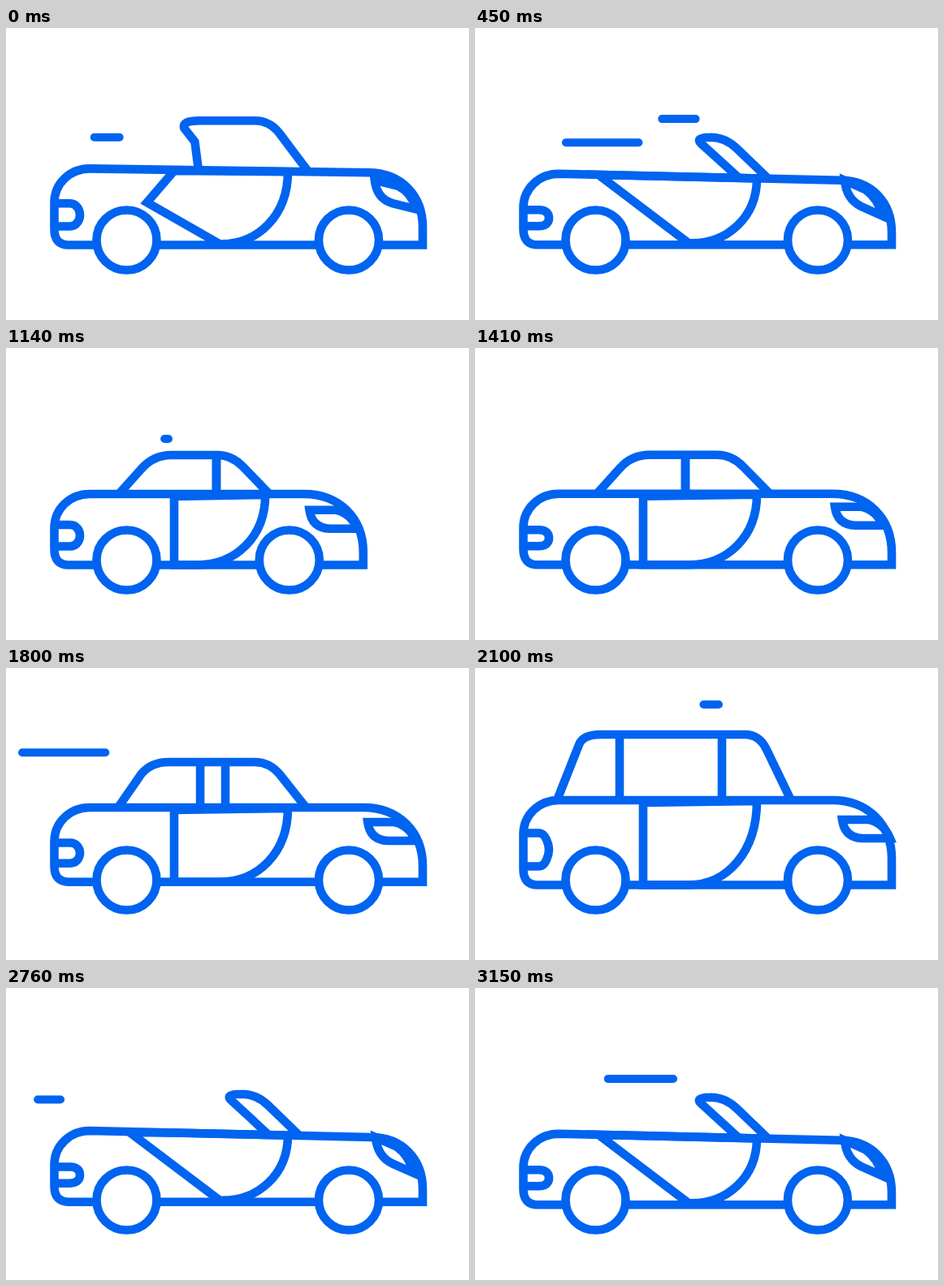
Animation, 570 px wide and 360 px high, one loop 3.18 s. Source, as an HTML page with a canvas:

```html
<!DOCTYPE html>
<html lang="en">
<head>
<meta charset="utf-8">
<title>Morphing car</title>
<style>
html, body { margin: 0; width: 100%; height: 100%; overflow: hidden; background: #fff; }
canvas { display: block; }
</style>
</head>
<body>
<canvas id="stage" width="570" height="360"></canvas>
<script>
const ctx = document.getElementById('stage').getContext('2d');
const BLUE = '#0064f0';
const LOOP = 3180, CYCLE = 2640, MORPH = 360;
const SILL = 267.5, REAR = 59.5, DECK = 103, SIDE = 207;

// rear and front: where each roof pillar meets the belt, and its roof corner
// hinge: share of the rear pillar below its bend; round: size of the rear corner
const sedan = {
  nose: 513, belt: 180, tilt: 0, roof: 132, rear: [150, 193], front: [363, 316],
  hinge: 0.6, round: 22, door: 347, tail: 20, lamp: [443, 196], posts: [259, 259], open: 0
};
const coupe = {
  ...sedan, nose: 434, rear: [138, 181], front: [321, 275], door: 317, tail: 27, lamp: [368, 200]
};
const suv = {
  ...sedan, belt: 163, roof: 82, rear: [101, 133], front: [389, 350],
  hinge: 0.74, round: 13, tail: 41, lamp: [452, 187], posts: [178, 304]
};
const convertible = {
  ...sedan, belt: 180, tilt: 8, roof: 135, rear: [325, 270], front: [361, 308],
  hinge: 0.42, round: 11, lamp: [455, 188], open: 1
};

const cars = [convertible, coupe, sedan, suv];
const starts = [490, 1046, 1659, 2447];

// without a row, a streak keeps its height above the belt
const streaks = [
  { from: 145, to: 36, start: -93, span: 300 },
  { from: 270, to: 36, start: 394, span: 116 },
  { from: 272, to: 36, start: 367, span: 380, row: 112.3 },
  { from: 200, to: 5, start: 1120, span: 260, row: 112 },
  { from: 287, to: 20, start: 1520, span: 400, row: 108, lag: 0.3 },
  { from: 300, to: 36, start: 2060, span: 300, row: 45 }
];

const clamp = v => Math.max(0, Math.min(1, v));
const lerp = (a, b, k) => a + (b - a) * k;
const sine = v => (1 - Math.cos(Math.PI * clamp(v))) / 2;
const cubic = v => v < 0.5 ? 4 * v ** 3 : 1 - (2 - 2 * v) ** 3 / 2;
const mix = (a, b, k) => Array.isArray(a) ? a.map((v, i) => mix(v, b[i], k)) : lerp(a, b, k);

// key points of each part, in the same order for every car
function outline(car) {
  const { nose, belt, tilt, roof, open, door } = car;
  const hood = nose - lerp(73, 63, open);
  const beltAt = x => belt + tilt * clamp((x - DECK) / (hood - DECK));
  const along = (base, tip, k) => mix([base, beltAt(base)], [tip, roof], k);

  const [rearBase, rearTip] = car.rear;
  const [frontBase, frontTip] = car.front;
  const rearLen = Math.hypot(rearTip - rearBase, roof - beltAt(rearBase));
  const frontLen = Math.hypot(frontTip - frontBase, roof - beltAt(frontBase));

  const seam = 3 * (1 - open);
  const lean = 0.45 * open, squeeze = 1 - 0.2 * open;
  const lampAt = (x, y) => [car.lamp[0] + x * squeeze, car.lamp[1] + y + x * squeeze * lean];

  return {
    hood: [hood, belt + tilt],
    nose: [nose, belt + 72],
    belt,
    rear: [
      along(rearBase, rearTip, 0),
      along(rearBase, rearTip, car.hinge),
      along(rearBase, rearTip, Math.max(car.hinge, 1 - car.round / rearLen)),
      [rearTip, roof],
      [rearTip + 22, roof]
    ],
    front: [
      [frontTip - 18, roof],
      [frontTip, roof],
      along(frontBase, frontTip, 1 - 20 / frontLen),
      along(frontBase, frontTip, 0)
    ],
    door: [
      [SIDE, beltAt(SIDE) + seam],
      [door, beltAt(door) + seam / 3],
      [door, lerp(belt, SILL, 0.6)],
      [door - 36, SILL],
      [door - 84, SILL - 2 * open],
      mix([SIDE, SILL], [152, beltAt(152)], open)
    ],
    lamp: [lampAt(0, 0), lampAt(33, 0), lampAt(51, 4), lampAt(59, 23), lampAt(25, 23), lampAt(3, 22)],
    tail: car.tail,
    posts: car.posts,
    open
  };
}

function shapeAt(t) {
  const p = t < starts[0] ? t + CYCLE : t;
  const i = starts.findLastIndex(s => s <= p);
  const k = cubic(clamp((p - starts[i]) / MORPH));
  const a = outline(cars[i]), b = outline(cars[(i + 1) % cars.length]);
  return Object.fromEntries(Object.keys(a).map(key => [key, mix(a[key], b[key], k)]));
}

const move = p => ctx.moveTo(...p);
const line = (...points) => points.forEach(p => ctx.lineTo(...p));
const bend = (c, p) => ctx.quadraticCurveTo(...c, ...p);
const curve = (c, d, p) => ctx.bezierCurveTo(...c, ...d, ...p);

function stroke(draw) {
  ctx.beginPath();
  draw();
  ctx.stroke();
}

function drawBody({ hood, nose, belt }) {
  stroke(() => {
    move([112, SILL]);
    line([77, SILL]);
    bend([REAR, SILL], [REAR, 248]);
    line([REAR, belt + 42]);
    curve([REAR, belt + 18], [79, belt], [DECK, belt]);
    line(hood);
    curve([lerp(hood[0], nose[0], 0.6), hood[1]], [nose[0], lerp(hood[1], nose[1], 0.42)], nose);
    line([nose[0], SILL], [112, SILL]);
  });
}

function drawRoof({ rear, front }) {
  stroke(() => {
    move(rear[0]);
    line(rear[1], rear[2]);
    bend(rear[3], rear[4]);
    line(front[0]);
    bend(front[1], front[2]);
    line(front[3]);
  });
}

function drawPosts({ posts, open, belt, front }) {
  const height = clamp(1 - 2 * open);
  if (!height) return;
  for (const x of posts) {
    stroke(() => {
      move([x, belt]);
      line([x, lerp(belt, front[0][1], height)]);
    });
  }
}

function drawDoor({ door }) {
  stroke(() => {
    move(door[0]);
    line(door[1]);
    curve(...door.slice(2, 5));
    line(door[5]);
    ctx.closePath();
  });
}

function drawLamp({ lamp }) {
  stroke(() => {
    move(lamp[0]);
    line(lamp[1]);
    bend(lamp[2], lamp[3]);
    line(lamp[4]);
    bend(lamp[5], lamp[0]);
    ctx.closePath();
  });
}

function drawTail({ tail }) {
  const right = 91, bottom = 244.5, top = bottom - tail, mid = bottom - tail / 2;
  stroke(() => {
    move([REAR, top]);
    line([right - 12, top]);
    curve([right - 4, top], [right, mid - 6], [right, mid]);
    curve([right, mid + 6], [right - 4, bottom], [right - 12, bottom]);
    line([REAR, bottom]);
  });
}

function drawWheel(x) {
  ctx.beginPath();
  ctx.arc(x, 261.5, 37, 0, Math.PI * 2);
  ctx.fill();
  ctx.stroke();
}

function drawStreak({ from, to, start, span, row, lag = 0.2 }, t, belt) {
  const u = (t - start + CYCLE) % CYCLE / span;
  if (u <= 0 || u >= 1) return;
  const y = row ?? belt - 38.5;
  stroke(() => {
    move([lerp(from, to, sine((u - lag) / (1 - lag))), y]);
    line([lerp(from, to, sine(u / (1 - lag))), y]);
  });
}

function draw(time) {
  const t = time % CYCLE;
  const car = shapeAt(t);
  const bob = -3.8 * Math.max(0, -Math.sin(time / 240 * Math.PI)) ** 3;

  ctx.fillStyle = '#fff';
  ctx.fillRect(0, 0, 570, 360);
  ctx.strokeStyle = BLUE;
  ctx.lineWidth = 10.6;
  ctx.lineCap = 'butt';

  ctx.save();
  ctx.translate(0, bob);
  for (const part of [drawBody, drawRoof, drawPosts, drawDoor, drawLamp, drawTail]) part(car);
  ctx.lineCap = 'round';
  ctx.lineWidth = 10;
  streaks.forEach(s => drawStreak(s, t, car.belt));
  ctx.restore();

  drawWheel(148.5);
  drawWheel(car.nose[0] - 91);
}

const begin = performance.now();
function tick() {
  draw((performance.now() - begin) % LOOP);
  requestAnimationFrame(tick);
}
draw(0);
requestAnimationFrame(tick);
</script>
</body>
</html>
```
